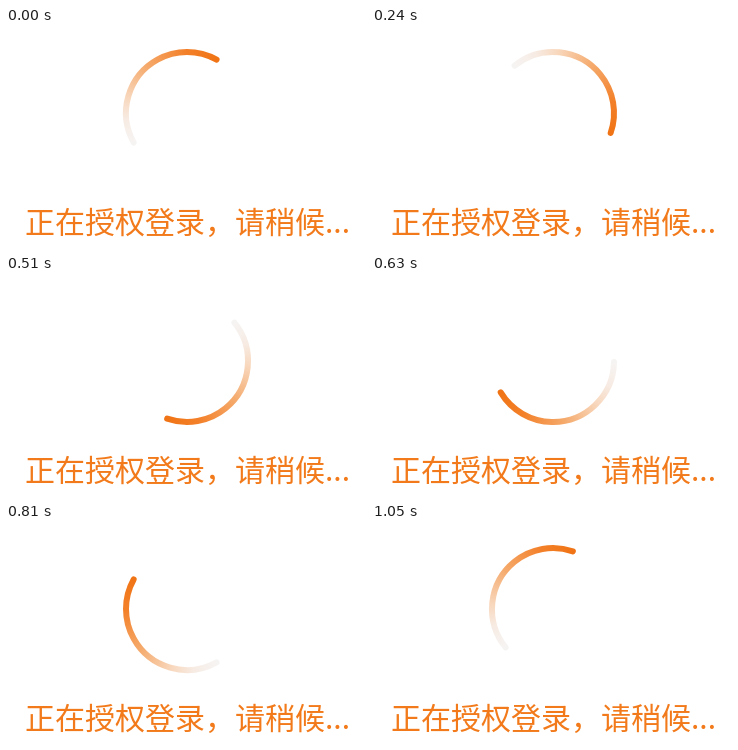
An HTML page with a canvas that plays this animation: 360x220 px, repeating every 1.08 s.

```html
<!DOCTYPE html>
<html lang="zh-CN">
<head>
<meta charset="utf-8">
<style>
  html, body { margin: 0; width: 360px; height: 220px; overflow: hidden; background: #fff; }
  svg, canvas { position: absolute; left: 0; top: 0; }
  canvas { filter: blur(0.4px); }
  text { font: 30px "Noto Sans CJK SC", "Noto Sans CJK", sans-serif; fill: #f27a1a; }
</style>
</head>
<body>
<canvas width="360" height="220"></canvas>
<svg width="360" height="220"><text x="19" y="205">正在授权登录&#xff0c;请稍候...</text></svg>
<script>
const LOOP = 1080, STEP = 30;
const CX = 181, CY = 85, RADIUS = 61, WIDTH = 6;
const RAD = Math.PI / 180, SPAN = 148, HEAD = -61;
const ctx = document.querySelector('canvas').getContext('2d');

// Colours by distance in degrees behind the head; the margin covers the round caps.
const MARGIN = 10;
const fade = ctx.createConicGradient((HEAD - SPAN - MARGIN) * RAD, 0, 0);
const stop = (behind, color) => fade.addColorStop((MARGIN + SPAN - behind) / 360, color);
stop(SPAN, '#f6f4f3');
stop(125, '#f7ebe3');
stop(105, '#f8d8be');
stop(70, '#f5aa6c');
stop(30, '#f38029');
stop(0, '#f07415');
stop(-MARGIN, '#f07415');

ctx.lineWidth = WIDTH;
ctx.lineCap = 'round';
ctx.strokeStyle = fade;

function draw(now) {
  const time = Math.floor(now % LOOP / STEP) * STEP;
  ctx.clearRect(0, 0, 360, 220);
  ctx.save();
  ctx.translate(CX, CY);
  ctx.rotate(time / LOOP * 2 * Math.PI);
  ctx.beginPath();
  ctx.arc(0, 0, RADIUS, (HEAD - SPAN) * RAD, HEAD * RAD);
  ctx.stroke();
  ctx.restore();
}

function tick() {
  draw(performance.now());
  requestAnimationFrame(tick);
}
tick();
</script>
</body>
</html>
```
